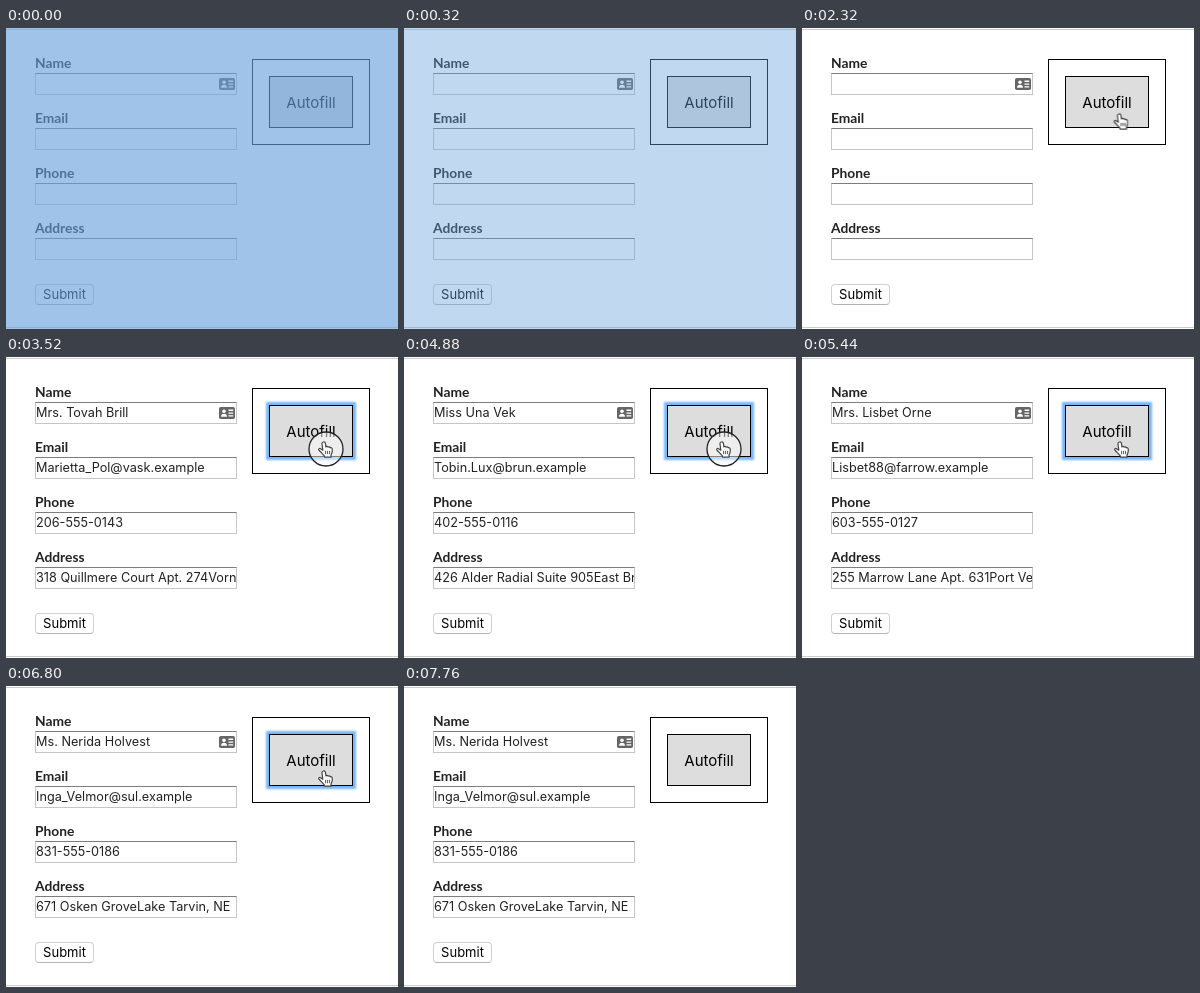
Animation of 392 by 301 pixels, one loop 7.84 s. Source, as an HTML page:

```html
<!DOCTYPE html>
<html lang="en">
<head>
<meta charset="utf-8">
<title>Form autofill</title>
<style>
  html, body { margin: 0; width: 100%; height: 100%; overflow: hidden; background: #fff; }
  #stage { position: relative; width: 392px; height: 301px; overflow: hidden; font-family: Inter, Roboto, sans-serif; color: #000; }
  #stage * { box-sizing: border-box; }
  #stage > * { position: absolute; }

  .rule { left: 0; width: 392px; height: 1px; background: #ccc; }

  .row { left: 29px; width: 202px; height: 40px; }
  .row b { position: absolute; left: 0; top: 0; font: 700 13.8px/16px Lato, sans-serif; color: #222; }
  .field {
    position: absolute; left: 0; top: 18px; width: 202px; height: 22px; overflow: hidden;
    border: 1px solid #c6c6c6; border-top-color: #7d7d7d;
  }
  .values { white-space: pre; font-size: 12.7px; line-height: 20px; color: #222; }

  .submit {
    left: 29px; top: 256px; width: 59px; height: 21px; border: 1px solid #d0d0d0; border-bottom-color: #b4b4b4;
    border-radius: 4px; font-size: 13px; line-height: 19px; text-align: center;
  }
  .panel { left: 246px; top: 31px; width: 118px; height: 86px; border: 1px solid #000; }
  .button {
    left: 263px; top: 48px; width: 84px; height: 52px; border: 1px solid #000; background: #ddd;
    font-size: 15px; line-height: 51px; text-align: center;
  }
  .veil { inset: 0; background: rgb(105, 162, 220); }
  svg { overflow: visible; }
  .cursor { left: 0; top: 0; width: 1px; height: 1px; }

  .values, .button, .veil, .cursor, .ring, .arrow, .hand { animation: 7840ms step-end infinite; }
  .values { animation-name: fill; }
  .button { animation-name: focus; }
  .veil { animation-name: veil; }
  .cursor { animation-name: move; }
  .ring { animation-name: click; }
  .arrow { animation-name: arrow; }
  .hand { animation-name: hand; }

  @keyframes veil {
    0% { opacity: .63; }
    4.08% { opacity: .42; }
    5.1% { opacity: .21; }
    6.12%, 100% { opacity: 0; }
  }
  @keyframes fill {
    0% { transform: translateY(0); }
    34.69% { transform: translateY(-20px); }
    46.93% { transform: translateY(-40px); }
    57.14% { transform: translateY(-60px); }
    64.28% { transform: translateY(-80px); }
    69.38% { transform: translateY(-100px); }
    73.46% { transform: translateY(-120px); }
    80.61% { transform: translateY(-140px); }
    86.73%, 100% { transform: translateY(-160px); }
  }
  @keyframes focus {
    0%, 98.97%, 100% { box-shadow: none; }
    32.65% { box-shadow: 0 0 2px 3px #74b5fb; }
  }
  @keyframes move {
    0% { opacity: 0; transform: translate(370px, 171px); }
    8.16% { opacity: 1; transform: translate(370px, 171px); animation-timing-function: steps(2); }
    10.2% { opacity: 1; transform: translate(296px, 77px); animation-timing-function: steps(7); }
    17.34% { opacity: 1; transform: translate(303px, 82px); }
    26.53% { opacity: 1; transform: translate(303px, 82px); animation-timing-function: steps(3); }
    29.59% { opacity: 1; transform: translate(319.5px, 93px); animation-timing-function: steps(2); }
    31.63% { opacity: 1; transform: translate(320px, 92px); }
    88.77% { opacity: 1; transform: translate(333px, 104px); }
    89.79%, 100% { opacity: 0; transform: translate(333px, 104px); }
  }
  @keyframes click {
    0%, 21.42%, 34.69%, 46.93%, 57.14%, 64.28%, 69.38%, 73.46%, 80.61%, 86.73%, 100% { opacity: 0; }
    19.38%, 32.65%, 44.89%, 55.1%, 62.24%, 67.34%, 72.44%, 78.57%, 84.69% { opacity: 1; }
  }
  @keyframes arrow { 0% { opacity: 1; } 27.55%, 100% { opacity: 0; } }
  @keyframes hand { 0% { opacity: 0; } 27.55%, 100% { opacity: 1; } }
</style>
</head>
<body>
<div id="stage">
  <div class="rule" style="top:1px"></div>
  <div class="rule" style="top:299px"></div>

  <div class="row" style="top:27px"><b>Name</b><div class="field"><div class="values">
Mrs. Tovah Brill
Mr. Corvin Astley
Miss Una Vek
Dr. Perrin Holm
Mrs. Lisbet Orne
Ms. Odette Varn
Mr. Jorun Pelk
Ms. Nerida Holvest</div></div></div>

  <div class="row" style="top:82px"><b>Email</b><div class="field"><div class="values">
Marietta_Pol@vask.example
Corvin.A@mellow.example
Tobin.Lux@brun.example
Perrin_Holm@ost.example
Lisbet88@farrow.example
Edda.Norvik@pim.example
Jorun.Pelk@tarn.example
Inga_Velmor@sul.example</div></div></div>

  <div class="row" style="top:137px"><b>Phone</b><div class="field"><div class="values">
206-555-0143
318-555-0178
402-555-0116
725-555-0191
603-555-0127
919-555-0164
540-555-0109
831-555-0186</div></div></div>

  <div class="row" style="top:192px"><b>Address</b><div class="field"><div class="values">
318 Quillmere Court Apt. 274Vorn Hollow
70 Tamsin Grove Suite 118North Pellam
426 Alder Radial Suite 905East Brindle
1184 Fennick PassLake Orsina, OH 440
255 Marrow Lane Apt. 631Port Velda
38 Wren HollowTilmaport, OR 974
907 Sorrel Ridge Suite 42New Harnett
671 Osken GroveLake Tarvin, NE</div></div></div>

  <svg style="left:213px;top:50px" width="16" height="12">
    <rect width="16" height="12" rx="1.8" fill="#666"/>
    <g fill="#fff">
      <circle cx="5" cy="4.3" r="1.8"/>
      <path d="M2 9.8c0-2 1.2-3 3-3s3 1 3 3z"/>
      <path d="M9.5 2.6h4.7v1.3H9.5zM9.5 5.4h4.7v1.3H9.5zM9.5 8.2h4.7v1.3H9.5z"/>
    </g>
  </svg>

  <div class="submit">Submit</div>
  <div class="panel"></div>
  <div class="button">Autofill</div>

  <svg class="cursor">
    <circle class="ring" r="17" fill="#fff" fill-opacity=".5" stroke="#222" stroke-width="1.3"/>
    <path class="arrow" d="M-6-9v14l3.2-3 2.2 5.2 2.3-1-2.2-5h4.4z" fill="#111" stroke="#fff" stroke-width="1"/>
    <g class="hand" transform="translate(-8 -8)" stroke="#444" stroke-width="1.2" stroke-linejoin="round" stroke-linecap="round">
      <path fill="#fff" d="M4 3C3.6.8 6.9.2 7.4 2.2l.5 3.6c.5-.7 1.9-.7 2.3.4.6-.6 1.8-.4 2 .6.7-.4 1.9 0 2 1.1.2 1.9.1 3.2-.6 4.7l-.6 1.6v2H6.6l-.4-1.5C4.4 13 3 11 1 9.2c-.9-1 .3-2.2 1.6-1.5l2.2 1.5z"/>
      <path fill="none" stroke-width=".9" d="M7.6 10.2v2.6M9.6 10.2v2.6M11.6 10.2v2.6"/>
    </g>
  </svg>

  <div class="veil"></div>
</div>
</body>
</html>
```
